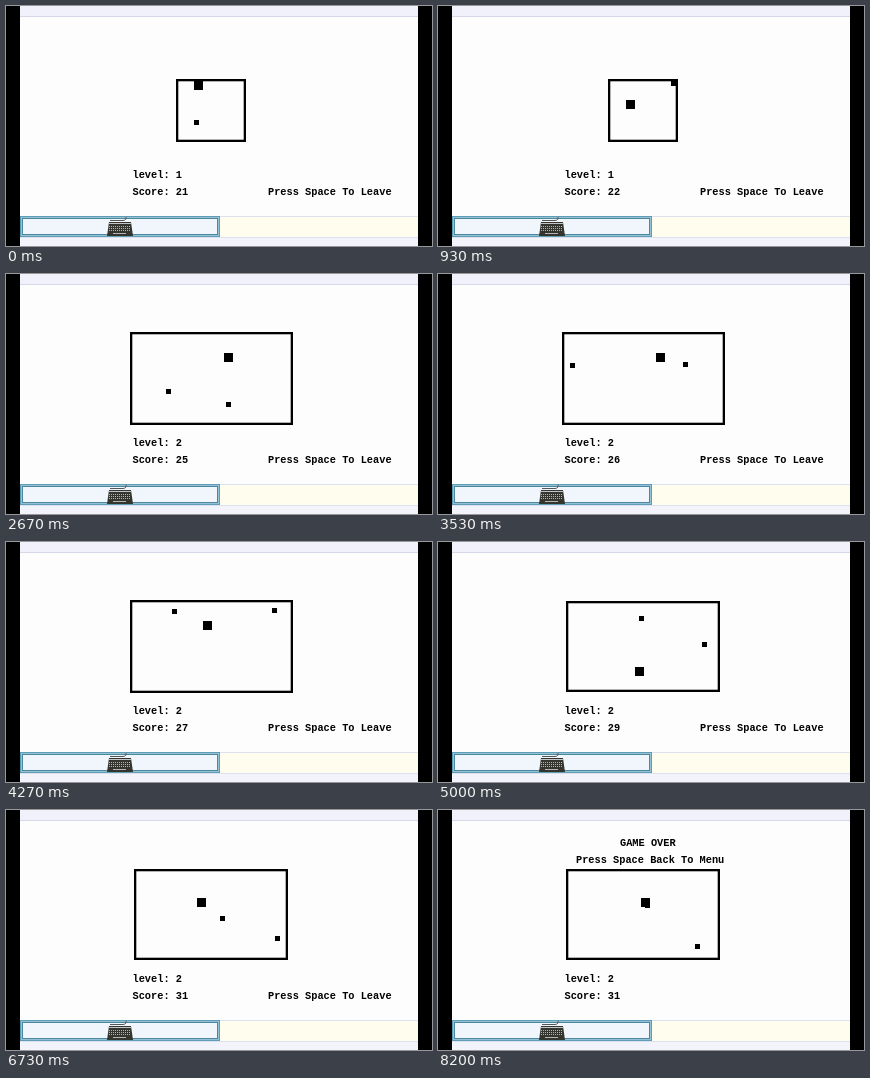
Animation, 426 px wide and 240 px high, one loop 8.27 s. Source, as an HTML page with a canvas:

```html
<!DOCTYPE html>
<html lang="en">
<head>
<meta charset="utf-8">
<title>Dodge game</title>
<style>
  html, body { margin: 0; width: 100%; height: 100%; overflow: hidden; background: #000; }
  canvas { display: block; width: 100%; height: 100%; image-rendering: pixelated; }
</style>
</head>
<body>
<canvas id="stage" width="426" height="240"></canvas>
<script>
const g = document.getElementById('stage').getContext('2d');
const LOOP = 8270, STEPS = 124, STEP = LOOP / STEPS, OVER = 105;
const CENTER = { x: 205.25, y: 104.5 }, MARGIN = 4.5;

// Places the player steers to: [step, x, y]
const stops = [
  [0, 192, 79], [14, 192, 98.5], [27, 195, 83], [53, 222.5, 83],
  [75, 201.5, 129], [101, 195, 92], [OVER, 207.5, 92]
];

const enemy = (x, y, vx, vy) => ({ x, y, vx, vy }); // speeds in pixels per second

function levelOne() {
  return { level: 1, score: 21, half: { x: 35.2, y: 31.25 }, enemies: [enemy(190.5, 116, 48.4, -41)] };
}

function levelUp(game) {
  game.level++;
  game.half = { x: 81.5, y: 46.75 };
  game.enemies = [enemy(181, 129.5, -46.8, -30), enemy(211.3, 149, 28.6, -46.5)];
}

// Every wall bounce scores; the arena shrinks and levels up at set scores.
function bounce(game, e, axis) {
  const side = Math.sign(e['v' + axis]), reach = game.half[axis] - MARGIN;
  if ((e[axis] - CENTER[axis]) * side < reach) return;
  e[axis] = CENTER[axis] + side * reach;
  e['v' + axis] *= -1;
  game.score++;
  if (game.score % 5 === 3) {
    game.half.x -= 4.5;
    game.half.y -= 1.5;
  }
  if (game.score === 25) levelUp(game);
}

function advance(game) {
  for (const e of game.enemies) {
    e.x += e.vx * STEP / 1000;
    e.y += e.vy * STEP / 1000;
    bounce(game, e, 'y');
    bounce(game, e, 'x');
  }
}

// Sideways in the first half of each stretch, up or down in the second.
function playerAt(n) {
  const i = Math.max(1, stops.findIndex(s => s[0] >= n));
  const [n0, x0, y0] = stops[i - 1], [n1, x1, y1] = stops[i];
  const p = 2 * (n - n0) / (n1 - n0);
  return { x: x0 + (x1 - x0) * Math.min(p, 1), y: y0 + (y1 - y0) * Math.max(p - 1, 0) };
}

const history = [];
for (let n = 0, game = levelOne(); n <= OVER; n++) {
  history.push(JSON.parse(JSON.stringify(game)));
  advance(game);
}

function rect(color, x, y, w, h) {
  g.fillStyle = color;
  g.fillRect(x, y, w, h);
}

function frame(color, x, y, w, h, line) {
  g.strokeStyle = color;
  g.lineWidth = line;
  g.strokeRect(x + line / 2, y + line / 2, w - line, h - line);
}

function square({ x, y }, size) {
  rect('#000', Math.round(x - size / 2), Math.round(y - size / 2), size, size);
}

function text(s, x, y) {
  g.fillStyle = '#000';
  g.fillText(s, x, y);
}

function keyboard() {
  g.strokeStyle = '#555';
  g.lineWidth = 1;
  g.beginPath();
  g.moveTo(104, 214.5);
  g.lineTo(117, 214.5);
  g.quadraticCurveTo(121, 214, 120, 211);
  g.stroke();
  g.fillStyle = '#35352f';
  g.beginPath();
  g.moveTo(103, 216);
  g.lineTo(125, 216);
  g.lineTo(127, 230);
  g.lineTo(101, 230);
  g.fill();
  rect('#c4c4c4', 103, 217, 22, 1);
  for (let row = 0; row < 3; row++)
    for (let i = 0; i < 11; i++)
      rect('#b4b4b4', 103 + 2 * i, 220 + 2 * row, 1, 1);
  rect('#b4b4b4', 107, 227, 13, 1);
}

function desktop() {
  rect('#000', 0, 0, 426, 240);
  rect('#fdfdfd', 14, 0, 398, 240);
  rect('#f0f1fb', 14, 0, 398, 10);
  rect('#d5d9ea', 14, 10, 398, 1);
  rect('#fffeee', 214, 211, 198, 20);
  rect('#f2f3fb', 14, 232, 398, 8);
  rect('#dde0ee', 14, 210, 398, 1);
  rect('#dde0ee', 14, 231, 398, 1);
  rect('#f1f6fd', 14, 210, 200, 21);
  frame('#5f9db5', 14, 210, 200, 21, 1);
  frame('#94c2d4', 15, 211, 198, 19, 1);
  frame('#4b88a0', 16, 212, 196, 17, 1);
  keyboard();
}

function draw(now) {
  const n = Math.floor(now % LOOP / STEP + 0.1), last = Math.min(n, OVER);
  const { level, score, half, enemies } = history[last];
  desktop();

  const left = Math.round(CENTER.x - half.x), top = Math.round(CENTER.y - half.y);
  const right = Math.round(CENTER.x + half.x), bottom = Math.round(CENTER.y + half.y);
  frame('#000', left, top, right - left, bottom - top, 2.3);
  enemies.forEach(e => square(e, 5));
  square(playerAt(last), 9);

  g.font = 'bold 10.3px "Liberation Mono", monospace';
  text('level: ' + level, 126.5, 172);
  text('Score: ' + score, 126.5, 189);
  if (n >= OVER) {
    text('GAME OVER', 182, 36);
    text('Press Space Back To Menu', 138, 53);
  } else text('Press Space To Leave', 262, 189);
}

const start = performance.now();
function tick() {
  draw(performance.now() - start);
  requestAnimationFrame(tick);
}
tick();
</script>
</body>
</html>
```
